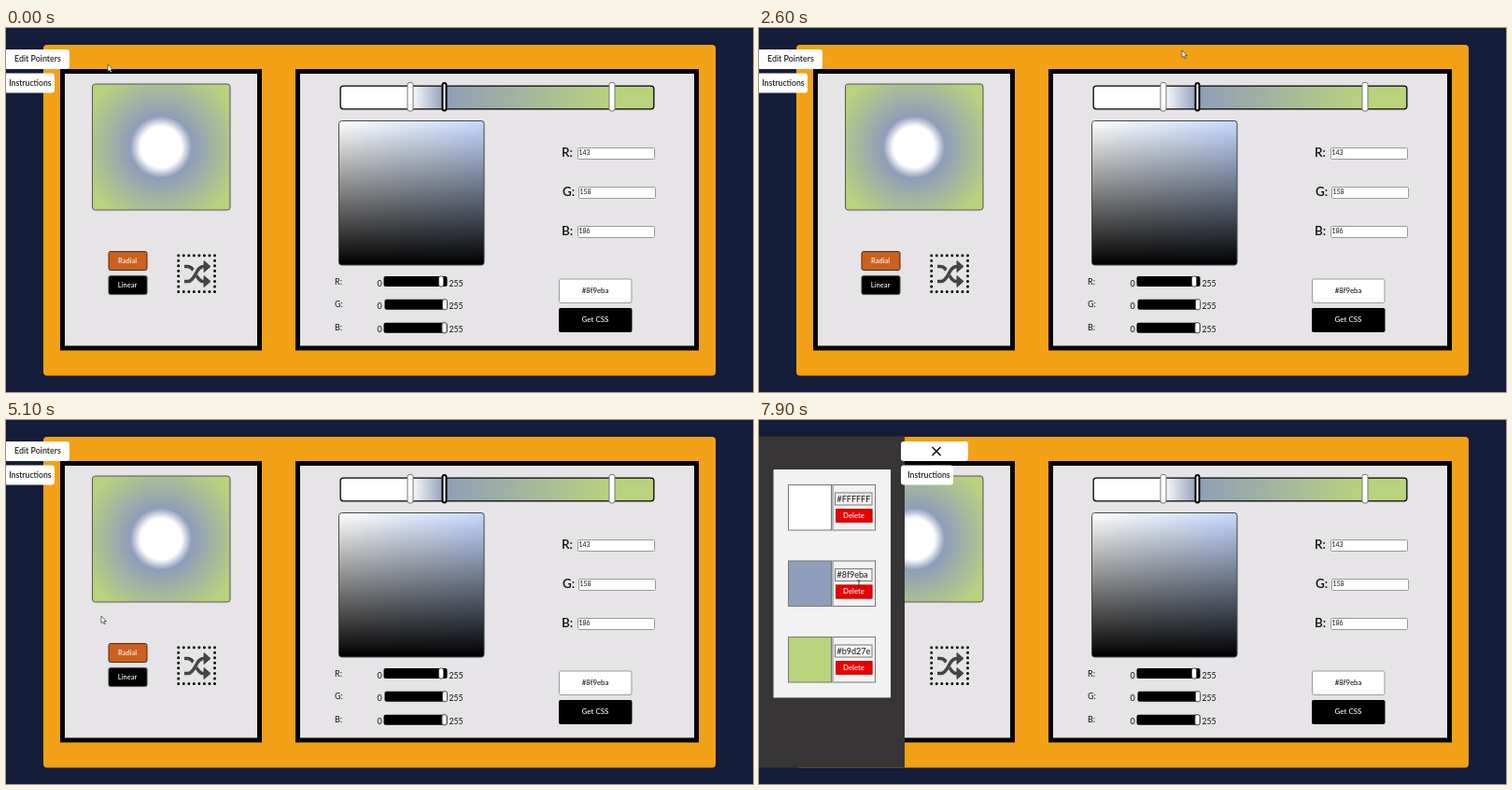
These frames come from a looping animation (800x390 px, 8000 ms). An HTML page:

```html
<!DOCTYPE html>
<html lang="en">
<head>
<meta charset="utf-8">
<title>Gradient editor</title>
<style>
html, body { margin: 0; width: 100%; height: 100%; overflow: hidden; background: #141d39; }
svg { display: block; width: 800px; height: 390px; font-family: Lato, "Open Sans", sans-serif; }
text { white-space: pre; }
</style>
</head>
<body>
<svg id="stage" viewBox="0 0 800 390">
  <defs>
    <radialGradient id="radial" gradientUnits="userSpaceOnUse" cx="166" cy="127.5" r="100">
      <stop offset=".22" stop-color="#fff"/><stop offset=".33" stop-color="#8f9eba"/><stop offset=".865" stop-color="#b9d27e"/>
    </radialGradient>
    <linearGradient id="bar">
      <stop offset=".223" stop-color="#fff"/><stop offset=".332" stop-color="#8f9eba"/><stop offset=".865" stop-color="#b9d27e"/>
    </linearGradient>
    <linearGradient id="tint"><stop stop-color="#fff"/><stop offset="1" stop-color="#c4d9ff"/></linearGradient>
    <linearGradient id="shade" x2="0" y2="1"><stop stop-opacity="0"/><stop offset="1"/></linearGradient>
  </defs>
  <g id="page"></g>
  <g id="drawer">
    <g id="panel"></g>
    <g id="tabs"></g>
    <g id="edit"></g>
    <path id="close" d="M98.5 29l9 9m0-9l-9 9" transform="translate(-69)" fill="none" stroke="#000" stroke-width="1.4"/>
  </g>
  <g id="cursor">
    <path id="arrow" d="M0 0V7.6L1.8 6L3 8.7L4.3 8.1L3.1 5.5H5.4Z" fill="#fff" stroke="#333" stroke-width=".7"/>
    <path id="beam" d="M-1.6-4H1.6M0-4V4M-1.6 4H1.6" fill="none" stroke="#333" stroke-width=".9"/>
  </g>
</svg>
<script>
const LOOP = 8000, STEP = 100;
const $ = id => document.getElementById(id);

// Box given by its outer edges, with the border drawn inside.
const box = (x1, y1, x2, y2, fill, line = 'none', w = 0, r = 0) =>
  `<rect x="${x1 + w / 2}" y="${y1 + w / 2}" width="${x2 - x1 - w}" height="${y2 - y1 - w}" rx="${r}" fill="${fill}" stroke="${line}" stroke-width="${w}"/>`;

// Text with y as its vertical centre.
const label = (x, y, size, str, { fill = '#111', anchor = 'start', weight = 400 } = {}) =>
  `<text x="${x}" y="${y + size * 0.35}" font-size="${size}" font-weight="${weight}" fill="${fill}" text-anchor="${anchor}">${str}</text>`;

const mid = { anchor: 'middle', weight: 500 };
const midWhite = { ...mid, fill: '#fff' };

const handle = (x, active) => active
  ? box(x - 3, 58, x + 3, 89.5, '#fff', '#000', 2, 2)
  : box(x - 3.5, 58, x + 3.5, 89.5, '#fff', '#777', 1, 2);

const slider = (name, y, x, thumb) =>
  label(352, y, 9, name + ':') + label(397.5, y + 2, 9, '0') +
  box(x, y - 5.5, 472.5, y + 5.5, '#000', 'none', 0, 2) +
  box(thumb - 3, y - 6, thumb + 3, y + 6, '#fff', '#444', 0.9, 2) +
  label(474.5, y + 2, 8.6, '255');

const channel = (name, value, y, x) =>
  label(x - 17, y - 1, 13.5, name + ':', { weight: 600 }) +
  box(x, y - 6.5, x + 83, y + 6.5, '#fff', '#999', 1, 1) +
  label(x + 1.5, y - 0.5, 7, value);

const shuffle = () => {
  const down = 'M191 255.5h3.5c8.5 0 8.5 16 17 16h2';
  const up = 'M191 271.5h3.5c8.5 0 8.5-16 17-16h2';
  const path = (d, color, w) => `<path d="${d}" fill="none" stroke="${color}" stroke-width="${w}"/>`;
  return `<rect x="184.7" y="243.7" width="38.8" height="38.8" fill="none" stroke="#000" stroke-width="3" stroke-linecap="round" stroke-dasharray="0 5.543"/>` +
    path(down, '#444', 3.4) + path('M198 267.5c4-4 5-8 10-11', '#e6e4e7', 6.5) + path(up, '#444', 3.4) +
    '<path d="M212 249.5l7 6-7 6zM212 265.5l7 6-7 6z" fill="#444" stroke="#444" stroke-linejoin="round"/>';
};

const swatch = (hex, y) =>
  box(31, y, 78, y + 49.5, hex, '#777', 1) + box(78.5, y, 125, y + 49.5, '#f2f2f2', '#777', 1) +
  box(81, y + 8.5, 121.5, y + 22.5, '#f6f6f6', '#777', 1) + label(83.5, y + 15.5, 9, hex) +
  box(82, y + 26, 121.5, y + 41, '#e60000', '#900', 0.6) + label(101.5, y + 33.2, 7.8, 'Delete', midWhite);

$('page').innerHTML = [
  box(0, 0, 800, 390, '#141d39'),
  box(40, 18, 760, 372.5, '#f3a116', 'none', 0, 4),
  box(58, 44, 274, 345.5, '#e6e4e7', '#000', 5),
  box(310, 44, 742, 345.5, '#e6e4e7', '#000', 5),
  box(92, 59.5, 240.5, 195.5, 'url(#radial)', '#555', 1, 3),
  box(109.5, 239, 151.5, 260, '#cb601f', '#4a2a12', 1, 2),
  label(130, 249.3, 7.5, 'Radial', midWhite),
  box(109.5, 265, 151.5, 286, '#000', '#555', 0.8, 2),
  label(130, 275, 7.5, 'Linear', midWhite),
  shuffle(),
  box(357.5, 61.5, 694.5, 87.5, 'url(#bar)', '#000', 1.3, 3),
  handle(433), handle(469.5, true), handle(649),
  box(356, 99, 512.5, 254.5, 'url(#tint)', 'none', 0, 3),
  box(356, 99, 512.5, 254.5, 'url(#shade)', '#444', 1, 3),
  slider('R', 271.5, 404.5, 466), slider('G', 296.3, 405.5, 470), slider('B', 321.3, 404.5, 469.5),
  channel('R', 143, 134.5, 612), channel('G', 158, 176.5, 613), channel('B', 186, 218.5, 612),
  box(592, 268.5, 670.5, 295, '#fff', '#999', 1, 2),
  label(631, 281.3, 7.8, '#8f9eba', mid),
  box(592, 300, 670.5, 326, '#000', 'none', 0, 2),
  label(631, 312.3, 8, 'Get CSS', midWhite)
].join('');

$('panel').innerHTML = `<g transform="translate(-156)">${
  box(0, 17.5, 156, 372.5, '#383536') + box(15.5, 53, 141, 297.5, '#f2f2f2') +
  swatch('#FFFFFF', 69) + swatch('#8f9eba', 150.5) + swatch('#b9d27e', 232)}</g>`;

$('tabs').innerHTML =
  box(-4, 23, 68, 44, '#fff', 'none', 0, 3) + box(-4, 48.5, 52, 69.5, '#fff', 'none', 0, 3) +
  label(3.2, 58.7, 8.7, 'Instructions', { weight: 500 });
$('edit').innerHTML = label(9, 33, 8.9, 'Edit Pointers', { weight: 500 });

// Time, x, y of the pointer.
const route = [
  [0, 109, 39], [1000, 109, 39], [1200, 122, 43], [1600, 194, 61], [1900, 270, 58], [2300, 385, 38],
  [2600, 453, 24], [2700, 474, 7], [2800, 492, -14], [4000, 492, -14], [4100, 240, 40],
  [4400, 140, 180], [4700, 98, 335], [4900, 100, 290], [5100, 102, 210], [5400, 60, 100],
  [5700, 30, 38], [6200, 36, 33], [6700, 40, 35], [6900, 40, 35], [7300, 50, 62],
  [7600, 66, 128], [7900, 107, 176], [8000, 107, 176]
];

const anims = [];
const run = (id, frames, opts) => {
  const a = $(id).animate(frames, { duration: LOOP, fill: 'both', ...opts });
  a.pause();
  anims.push(a);
};
const swap = (id, at, from, to) => run(id, [
  { opacity: from, offset: 0, easing: 'step-end' },
  { opacity: to, offset: at / LOOP }, { opacity: to, offset: 1 }
]);

run('cursor', route.map(([t, x, y]) => ({ offset: t / LOOP, transform: `translate(${x}px, ${y}px)` })));
run('drawer', [{ transform: 'translate(0px)' }, { transform: 'translate(156px)' }],
  { delay: 6665, duration: 500, easing: 'ease' });
swap('edit', 6700, 1, 0);
swap('close', 6700, 0, 1);
swap('arrow', 7900, 1, 0);
swap('beam', 7900, 0, 1);

const start = performance.now();
function tick() {
  const t = (performance.now() - start) % LOOP;
  const held = Math.floor(t / STEP) * STEP;
  for (const a of anims) a.currentTime = held;
  requestAnimationFrame(tick);
}
tick();
</script>
</body>
</html>
```
